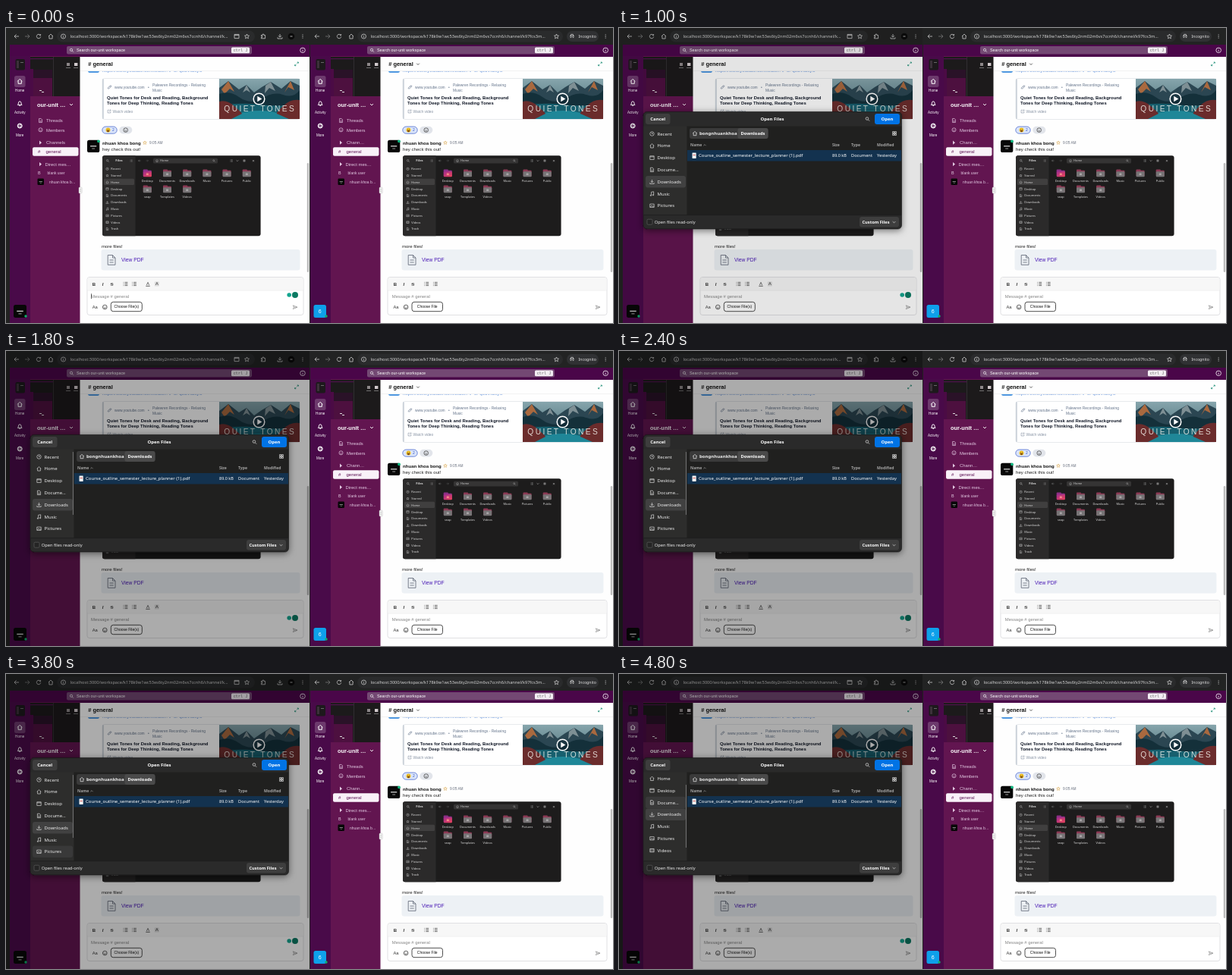
Animation of 800x389 px, one loop 5 s. Source, as an HTML page:

```html
<!DOCTYPE html>
<html lang="en">
<head>
<meta charset="utf-8">
<title>Team chat file upload</title>
<style>
html, body { margin: 0; width: 100%; height: 100%; overflow: hidden; background: #222; }
svg { display: block; width: 100vw; height: 100vh; font-family: "Liberation Sans", Arial, sans-serif; }
.ui { font-family: "Noto Sans", "Open Sans", sans-serif; }
.mono { font-family: "Liberation Mono", monospace; }
</style>
</head>
<body>
<svg id="stage" viewBox="0 0 800 389" preserveAspectRatio="none" xml:space="preserve"></svg>
<script>
const ICONS = {
  home: 'M-3 0L0-3 3 0M-2.1-.9V3H2.1V-.9',
  clock: 'M3 0A3 3 0 1 1-3 0A3 3 0 1 1 3 0M0-1.7V0H1.4',
  info: 'M3 0A3 3 0 1 1-3 0A3 3 0 1 1 3 0M0-.4V1.6M0-1.7V-1.2',
  desk: 'M-3-2.6H3V2.6H-3ZM-3-1.4H3',
  doc: 'M-2.3-3H.8L2.3-1.5V3H-2.3ZM-1 .2H1M-1 1.6H1',
  down: 'M0-3V1M-2-.8L0 1.2 2-.8M-3 1.4V3H3V1.4',
  note: 'M-1 2V-2.4L2.4-3V1.4M-1 2H-2.4V3H-1ZM2.4 1.4H1V2.4H2.4Z',
  pic: 'M-3-2.4H3V2.4H-3ZM-2.4 2L-.6-.2 1 1.2 2 .3 2.8 1.6',
  film: 'M-3-2.4H3V2.4H-3ZM-1.5-2.4V2.4M1.5-2.4V2.4',
  star: 'M0-3L.9-1 3-.8 1.4.6 1.9 2.8 0 1.7-1.9 2.8-1.4.6-3-.8-.9-1Z',
  find: 'M1.4-.6A2 2 0 1 1-2.6-.6A2 2 0 1 1 1.4-.6M.9.9L3 3',
  face: 'M3 0A3 3 0 1 1-3 0A3 3 0 1 1 3 0M-1.5.7Q0 2.4 1.5.7M-1.1-1.1V-.6M1.1-1.1V-.6',
  send: 'M-2.7-2.4L3 0-2.7 2.4-1.6 0ZM-1.6 0H3',
  bell: 'M-2.8 1.6Q-1.8.6-1.8-1Q-1.6-3 0-3Q1.6-3 1.8-1Q1.8.6 2.8 1.6ZM-.7 2.8H.7',
  gear: 'M3 0A3 3 0 1 1-3 0A3 3 0 1 1 3 0M0-3V-1M0 1V3M-3 0H-1M1 0H3M-2-2L-.8-.8M.8.8L2 2M-2 2L-.8.8M.8-.8L2-2',
  back: 'M3 0H-3M-.4-2.6L-3 0-.4 2.6',
  next: 'M-3 0H3M.4-2.6L3 0 .4 2.6',
  reload: 'M2.2-1.6A2.7 2.7 0 1 0 2.7.5M2.6-3V-1.3H.9',
  dots: 'M0-2.6V-1.8M0-.4V.4M0 1.8V2.6',
  chev: 'M-2-1L0 1 2-1',
  list: 'M-1-2.2H3M-1 0H3M-1 2.2H3M-3-2.2H-2.3M-3 0H-2.3M-3 2.2H-2.3',
  link: 'M-.4.4L1.4-1.4M-.8-.8L.8-2.4Q2-3 2.6-2.4 3.2-1.6 2.4-.8L.9.8M.8.8L-.8 2.4Q-2 3-2.6 2.4-3.2 1.6-2.4.8L-.9-.8',
  out: 'M0-2.4H-2.6V2.6H2.4V0M-.4.4L2.7-2.7M.8-2.7H2.7V-.8',
  wide: 'M.6-.6L2.6-2.6M.9-2.6H2.6V-.9M-.6.6L-2.6 2.6M-.9 2.6H-2.6V.9',
  grid: 'M-2.4-2.4H-.4V-.4H-2.4ZM.4-2.4H2.4V-.4H.4ZM-2.4.4H-.4V2.4H-2.4ZM.4.4H2.4V2.4H.4Z',
  puzzle: 'M-2.6-1.5H-.9V-2.8H.9V-1.5H2.6V2.8H-2.6V1.2H-1.2V-.2H-2.6Z',
  spy: 'M-3-.3H3M-1.8-.3L-1.3-2.6H1.3L1.8-.3M-2.4 1.5H-.7M.7 1.5H2.4'
};

const rect = (x, y, w, h, fill, r = 0, more = '') =>
  `<rect x="${x}" y="${y}" width="${w}" height="${h}" rx="${r}" fill="${fill}" ${more}/>`;
const edge = (color, w = .6) => `stroke="${color}" stroke-width="${w}"`;
const dot = (x, y, r, fill, more = '') => `<circle cx="${x}" cy="${y}" r="${r}" fill="${fill}" ${more}/>`;
// y is the optical middle of the line
const text = (x, y, s, size, fill, more = '') =>
  `<text x="${x}" y="${(y + size * .35).toFixed(2)}" font-size="${size}" fill="${fill}" ${more}>${s}</text>`;
const icon = (name, x, y, color, scale = 1, w = .8) =>
  `<path transform="translate(${x} ${y}) scale(${scale})" d="${ICONS[name]}" fill="none" stroke="${color}" stroke-width="${w}"/>`;
const path = (d, fill, more = '') => `<path d="${d}" fill="${fill}" ${more}/>`;
const bold = 'font-weight="700"', mid = 'text-anchor="middle"';

function avatar(x, y, s) {
  return rect(x, y, s, s, '#070707', s * .16) +
    rect(x + s * .25, y + s * .45, s * .5, s * .09, '#bbb') + rect(x + s * .38, y + s * .66, s * .24, s * .07, '#888');
}

function browserBar(right, e) {
  const tail = right ? 'k97fcs3m...' : 'k...', c = '#c9c9c9';
  let s = rect(0, 0, 404, 22, '#222323') + rect(67, 3.5, right ? 271 : 261, 15, '#2a2b2c', 7.5);
  s += icon('back', 14, 11, c) + icon('next', 28, 11, '#777') + icon('reload', 43, 11, c) + icon('home', 59, 11, c) + icon('info', 75.5, 11, c);
  s += text(84.5, 11, `localhost:3000/workspace/k178k9w1wc53es6ty2nm02m6vs7ccnh6/channel/${tail}`, 5.62, '#d4d4d4', 'class="ui"');
  s += icon('dots', 391 + e * .8, 11, c, 1, 1.2);
  if (right) return s + icon('star', 329.5, 11, c) + rect(343, 4, 42, 14, '#303133', 7) + icon('spy', 350, 11, '#ddd') +
    text(358.5, 11, 'Incognito', 5.2, '#e2e2e2', 'class="ui"');
  return s + icon('desk', 304, 11, c) + icon('star', 317.5, 11, c) + icon('puzzle', 339, 11, c) +
    icon('down', 361, 11, c) + dot(376, 11, 4.3, '#0b0b0b') + rect(374.5, 10.5, 3, 1, '#aaa');
}

function toolbar(e) {
  return rect(5, 22, 400, 16, '#4a0649') + rect(80, 24, 244 + e * .75, 10.6, '#734873', 2) +
    icon('find', 86.5, 29.3, '#fff', .8) + text(93, 29.4, 'Search our-unit workspace', 5.4, '#fff') +
    rect(297 + e, 25.5, 24, 7.8, '#f3edf3', 1.5) + text(309 + e, 29.4, 'ctrl J', 5.2, '#666', `class="mono" ${mid}`) +
    icon('info', 391 + e * .8, 29.3, '#fff', 1.1, .7);
}

function rail(right) {
  let s = rect(5, 37, 27, 352, '#490a49');
  s += rect(12.5, 41, 12.5, 14.5, '#1d191c', 2) + rect(14, 43, 3, 10, '#3c303a') + rect(19, 45, 4, 1, '#666');
  s += rect(11, 63, 14.5, 15, '#6d3a6d', 2.5) + icon('home', 18.2, 70.3, '#fff', 1, 1);
  s += icon('bell', 18.2, 99.8, '#fff', 1, 1) + icon('gear', 18.2, 129, '#fff', 1, 1);
  [['Home', 82.5], ['Activity', 111.8], ['More', 141]].forEach(([n, y]) => s += text(18.2, y, n, 4.6, '#fff', mid));
  s += right
    ? rect(9.5, 365, 16.5, 17, '#0ea0ea', 2.5) + text(17.8, 373.5, '6', 7, '#fff', mid)
    : avatar(10, 365, 17);
  return s + dot(26, 380, 1.7, '#0fae6d');
}

function sidebar(right) {
  const soft = '#e3cbe3';
  let s = rect(32, 37, 66, 352, '#621550');
  s += rect(32, 38, 66, 52, '#1c1a1b') + rect(32, 40, 30, 1.2, '#4e134b') + rect(32, 54, 4, 36, '#4b0b45') +
    rect(36, 66, 25, 24, '#4d103f') + rect(36, 55, 25, 11, '#2a1228') + rect(44, 82, 3, 1, '#ddd') + rect(47, 84, 3, 1, '#ddd') +
    rect(62, 38, .8, 52, '#383438') + rect(80, 46, 4, 4, '#8d8789') + rect(90, 46, 4.4, 4, '#d0c8cb') + rect(79, 52, 6, .8, '#888') + rect(89, 52, 6, .8, '#888');
  s += text(41, 101, 'our-unit …', 7.4, '#fff', bold) + icon('chev', 86, 101, '#fff', 1, .9);
  s += icon('doc', 45.5, 122, soft, .85) + text(53, 122, 'Threads', 5.9, soft);
  s += icon('face', 45.5, 134.3, soft, .85) + text(53, 134.5, 'Members', 5.9, soft);
  s += path('M44 148.6L47 151.2 44 153.8Z', soft) + text(53, 151.3, right ? 'Chann…' : 'Channels', 5.9, soft);
  s += rect(35, 157.2, 60.5, 11.5, '#f9f1f8', 2) + text(42, 163, '#', 6, '#5b1152') + text(52.5, 163, 'general', 6, '#5b1152');
  s += path('M44 177L47 179.6 44 182.2Z', soft) + text(51.5, 179.6, 'Direct mes…', 5.9, soft);
  s += text(42, 191, 'B', 5.4, soft) + text(54.5, 191, 'blank user', 5, soft);
  return s + avatar(41.5, 198.5, 8.5) + text(57, 203, 'nhuan khoa b…', 4.9, soft);
}

function thumb(e) {
  const x = 281 + e;
  let s = rect(x, 67, 106, 53, 'url(#sky)');
  const hill = (d, f) => path(d, f, `transform="translate(${x} 67)"`);
  s += hill('M0 12L12 3 26 14 36 8 46 18 56 11 68 4 82 13 94 3 106 9V40H0Z', '#2b4652');
  s += hill('M12 3L20 17 14 13 7 20 3 14ZM94 3L99 15 91 11 86 18Z', '#a9693f');
  s += hill('M36 8L41 18 36 15 31 18ZM68 4L74 16 66 12 60 19 61 9Z', '#7e8f94');
  s += hill('M0 20Q14 15 26 24T54 28Q70 16 84 21T106 15V42H0Z', '#14303a');
  s += hill('M0 35Q26 31 53 34T106 34V53H0Z', '#175f6e');
  s += hill('M20 47Q54 37 84 47L92 53H14Z', '#1f8798');
  s += hill('M0 30Q10 27 20 36T30 46L16 53H0ZM106 28Q94 26 84 36T76 46L92 53H106Z', '#6b2c2c');
  s += dot(x + 52.5, 93.5, 7.3, '#102a35', `fill-opacity=".55" ${edge('#fff', 1.5)}`) + path(`M${x + 50.3} 89.8L${x + 56.4} 93.5 ${x + 50.3} 97.2Z`, '#fff');
  return s + text(x + 53.8, 106, 'QUIET TONES', 10.2, '#f4f4ef', `${mid} letter-spacing="2.4" fill-opacity=".85"`);
}

function linkCard(e) {
  const grey = '#64748b';
  return `<g clip-path="url(#cut)">${rect(108, 48, 15, 10.8, '#1677d8', 2)}${text(127, 55.8, 'https://www.youtube.com/watch?v=oPq8dVk2xyU', 6, '#2a6cd0')}</g>` +
    rect(127, 66.5, 260 + e, 54, '#fff', 3, edge('#d9dde3')) + rect(127, 67, 1.8, 53, '#cbd2da', .9) +
    icon('link', 136.5, 78, grey, .8) + text(143, 78, 'www.youtube.com', 4.9, grey) + text(187, 78, '•', 4.9, grey) +
    text(193, 75, 'Palewren Recordings - Relaxing', 4.9, grey) + text(193, 82, 'Music', 4.9, grey) +
    text(133, 92, 'Quiet Tones for Desk and Reading, Background', 5.9, '#111827', bold) +
    text(133, 99.4, 'Tones for Deep Thinking, Reading Tones', 5.9, '#111827', bold) +
    icon('out', 136, 110, '#8793a3', .75) + text(140.5, 110, 'Watch video', 4.9, '#8793a3') + thumb(e);
}

function folder(x, y, name, vivid) {
  return rect(x - 5.5, y - 5, 6, 4, vivid ? '#8d2f86' : '#8c3a55', .8) + rect(x - 5.5, y - 3.8, 11, 8, vivid ? '#8d2f86' : '#8c3a55', 1) +
    rect(x - 5.5, y - 2.2, 11, 7, vivid ? 'url(#pink)' : '#777476', 1) + rect(x - 1.5, y, 3, 2.6, vivid ? '#f48a8a' : '#a9a6a8', .4) +
    text(x, y + 10, name, 3.9, '#ddd', `class="ui" ${mid}`);
}

function fileShot() {
  let s = rect(127, 168.2, 208.6, 106, '#1d1c1c', 3) + path('M130 168.2H170.5V274.2H130Q127 274.2 127 271.2V171.2Q127 168.2 130 168.2Z', '#2b2a2a');
  s += icon('find', 134, 175, '#bbb', .6) + text(149, 175, 'Files', 4.2, '#ddd', `class="ui" ${mid} ${bold}`) + icon('list', 165, 175, '#aaa', .5);
  s += icon('back', 176, 175, '#999', .5) + icon('next', 186, 175, '#666', .5) + rect(194, 171.7, 85, 6.8, '#353434', 1.5) +
    icon('home', 199, 175, '#ccc', .5) + text(203, 175, 'Home', 4, '#ccc', 'class="ui"') + icon('find', 274, 175, '#bbb', .5);
  s += icon('list', 297, 175, '#bbb', .55) + icon('chev', 305, 175, '#bbb', .7) + icon('grid', 314, 175, '#bbb', .5) + text(326, 174.8, '×', 6, '#bbb', mid);
  s += rect(129, 198.8, 40, 8.2, '#403f3f', 1.5);
  const kinds = ['clock', 'star', 'home', 'desk', 'doc', 'down', 'note', 'pic', 'film', 'doc'];
  ['Recent', 'Starred', 'Home', 'Desktop', 'Documents', 'Downloads', 'Music', 'Pictures', 'Videos', 'Trash'].forEach((n, i) => {
    const y = 185.8 + i * 8.8;
    s += icon(kinds[i], 133.5, y, '#ccc', .55) + text(138.3, y, n, 3.9, '#ddd', 'class="ui"');
  });
  ['Desktop', 'Documents', 'Downloads', 'Music', 'Pictures', 'Public', 'snap', 'Templates', 'Videos'].forEach((n, i) =>
    s += folder(186.3 + i % 6 * 26.2, i < 6 ? 191.5 : 212.5, n, !i));
  return s;
}

function messages(e) {
  let s = linkCard(e);
  s += rect(126.8, 130, 19.4, 9.2, '#dbe5fa', 4.6, edge('#3558c8', .7)) + dot(134.5, 134.6, 3, '#f5c628') +
    path('M132.5 135H136.5Q136 137 134.5 137T132.5 135Z', '#6b3a16') + dot(133.4, 133.7, .5, '#4a3010') + dot(135.6, 133.7, .5, '#4a3010') +
    text(141.3, 134.7, '2', 5, '#3558c8', mid);
  s += rect(149.3, 129.8, 17, 9.6, '#e2e5eb', 4.8) + icon('face', 157.7, 134.6, '#444', .95, .8);
  s += avatar(107, 147.7, 16.3) + dot(122, 149.3, 1.9, '#10b981');
  s += text(127, 151.4, 'nhuan khoa bong', 6.1, '#151515', bold) + icon('star', 183, 151.2, '#d9a548', .75) +
    text(189, 151.4, '9:05 AM', 4.8, '#6b7280') + text(127, 160, 'hey check this out!', 6.1, '#222');
  s += fileShot() + text(126, 287.6, 'more files!', 6, '#222');
  s += rect(125.5, 292, 262 + e, 27.5, '#edf1f5', 3) +
    path('M134.2 299.5H140.5L144 303V312.3H134.2ZM140.5 299.5V303H144M136.5 306H141.7M136.5 309H141.7', 'none', edge('#6b7280', .9));
  return s + text(152, 305.6, 'View PDF', 6.7, '#4a1bb5');
}

function composer(right, e) {
  const ink = '#333', o = right ? .8 : 0;
  let s = rect(107, 328.5, 285 + e, 50, '#fff', 3, edge('#d4d4d8', .7)) + rect(107.5, 329, 284 + e, 17, '#f7f7f7', 2.5) + rect(107, 345.8, 285 + e, .5, '#e3e3e3');
  s += text(116 + o, 337.5, 'B', 6, ink, `${mid} ${bold}`) + text(127.5 + o, 337.5, 'I', 6, ink, `${mid} font-style="italic" ${bold}`) +
    text(139.5 + o, 337.5, 'S', 6, ink, `${mid} text-decoration="line-through"`) + icon('list', 157.5 + o, 337.5, ink, .95) + icon('list', 169 + o, 337.5, ink, .95);
  if (!right) s += text(187, 336.8, 'A', 6, ink, mid) + rect(184.3, 339.8, 5.4, .8, ink) +
    rect(195.8, 334.4, 6, 6.2, '#ddd', .5) + text(198.8, 337.5, 'A', 5.6, ink, mid);
  s += text(112 + o, 353.6, 'Message # general', 5.9, '#858585') + text(113.7 + o, 368.2, 'Aa', 5.8, ink) + icon('face', 130.3 + o, 368, ink, .95);
  s += right
    ? rect(139, 361.3, 40.5, 12.4, '#fff', 3, edge('#222', .8)) + text(159.2, 367.3, 'Choose File', 5, '#111', mid)
    : rect(138.3, 361.3, 41, 12.4, '#fff', 3, `id="pick" ${edge('#222', .8)}`) +
      rect(137.7, 360.5, 42.2, 13.8, '#efeff2', 4, `id="ring" ${edge('#3a18b4', 1.2)}`) + text(158.8, 367.3, 'Choose File(s)', 5, '#111', mid) +
      rect(112, 350.3, .7, 6.8, '#222', 0, 'id="caret"') + dot(373.2, 352, 2.8, '#13a58f') + dot(381, 352, 4, '#0b7a63');
  return s + icon('send', 381 + e * .75, 368.2, '#9a9a9a');
}

function browser(right) {
  const e = right ? 4 : 0;
  let s = rect(0, 0, 404, 389, '#222') + browserBar(right, e) + toolbar(e) + rail(right) + sidebar(right) + rect(97.5, 38, 306.5, 351, '#fefefe');
  s += text(108.3, 47.3, '# general', 7.4, '#111', bold) + icon('wide', 383 + e, 47.4, '#128a70', .9, .9) + rect(98, 56, 306, .5, '#e4e4e4');
  if (right) s += icon('chev', 147, 47.6, '#222', .9);
  s += messages(e) + composer(right, e) + rect(396.8 + e, 178, 2.4, 144, '#bcbcbc', 1.2);
  s += rect(96, 210, 4.2, 8, '#f1f1f1', 1, edge('#bbb', .4)) + icon('dots', 98.1, 214, '#555', .7);
  return `<g transform="translate(${right ? 396 : 0})" clip-path="url(#${right ? 'winR' : 'winL'})">${s}</g>`;
}

function places() {
  const kinds = ['clock', 'home', 'desk', 'doc', 'down', 'note', 'pic', 'film'];
  return ['Recent', 'Home', 'Desktop', 'Docume…', 'Downloads', 'Music', 'Pictures', 'Videos'].map((n, i) => {
    const y = 139.5 + i * 15.8;
    return icon(kinds[i], 43.5, y, '#ddd', .9, .75) + text(50.5, y, n, 6, '#eee', 'class="ui"');
  }).join('');
}

function dialog() {
  const ui = 'class="ui"', head = `${ui} ${bold}`, dim = '#a5a5a5';
  let s = rect(32, 110.5, 340.5, 154.5, '#292929', 5, `${edge('#151515')} filter="url(#shadow)"`) +
    rect(32.5, 129.5, 57, 117, '#2d2d2c') + rect(89.5, 129.5, 282.7, 117, '#20201f');
  s += rect(35, 113, 32.5, 14, '#3d3d3d', 3) + text(51.2, 120, 'Cancel', 6, '#fff', `${head} ${mid}`) +
    text(202, 120, 'Open Files', 6, '#fff', `${head} ${mid}`) + icon('find', 327.5, 120, '#ddd', .9) +
    rect(337, 113, 33, 14, '#0073e5', 3) + text(353.5, 120, 'Open', 6, '#fff', `${head} ${mid}`);
  s += `<g clip-path="url(#side)"><g id="places">${rect(35, 195, 53, 15.5, '#414141', 3)}` +
    rect(35, 0, 53, 15.5, '#393939', 3, 'id="hover"') + `${places()}</g>` + rect(87.9, 133, 1, 83, '#777', .5, 'id="thumb"') + '</g>';
  s += rect(93, 132, 103.5, 14, '#3a3a3a', 3) + rect(156.5, 132, 40, 14, '#4a4a4a', 3) + icon('home', 100, 139, '#eee', .9) +
    text(106, 139, 'bongnhuankhoa', 6, '#eee', head) + text(176.5, 139, 'Downloads', 5.8, '#fff', `${head} ${mid}`) + icon('grid', 363, 139, '#ddd');
  s += text(94, 154.4, 'Name', 5.1, dim, head) + icon('chev', 113, 154.4, dim, -.8) + text(281, 154.4, 'Size', 5.1, dim, head) +
    text(306, 154.4, 'Type', 5.1, dim, head) + text(340, 154.4, 'Modified', 5.1, dim, head);
  s += rect(90, 161, 282, 14.5, '#13324f') + rect(96.5, 164.5, 5.2, 7.4, '#f0f0f0', .6) + rect(97.5, 167, 3.2, .8, '#c33');
  [[105, 'Course_outline_semester_lecture_planner (1).pdf', 6], [281, '89.0 kB', 5.5], [306, 'Document', 5.7], [340, 'Yesterday', 5.7]]
    .forEach(([x, n, size]) => s += text(x, 168.3, n, size, '#fff', ui));
  s += rect(32.5, 246.5, 339.5, .6, '#191919') + rect(37, 252.2, 7, 7, '#242424', 1.4, edge('#666')) + text(46.8, 256, 'Open files read-only', 5.7, '#eee', ui) +
    rect(317, 249, 52, 13.5, '#3e3e3e', 3) + text(320.5, 256, 'Custom Files', 5.7, '#fff', head) + icon('chev', 362.5, 256, '#ddd', .9);
  return `<g id="dialog">${s}</g>`;
}

const clip = (id, x, y, w, h) => `<clipPath id="${id}">${rect(x, y, w, h, '#000')}</clipPath>`;
const fade = (id, top, bottom, vec = 'x2="0" y2="1"') =>
  `<linearGradient id="${id}" ${vec}><stop stop-color="${top}"/><stop offset="1" stop-color="${bottom}"/></linearGradient>`;

const stage = document.getElementById('stage');
stage.innerHTML = `<defs>${clip('winL', 0, 0, 400, 389)}${clip('winR', 4, 0, 400, 389)}${clip('cut', 100, 57.3, 300, 3)}${clip('side', 32, 129.5, 58, 117)}` +
  fade('sky', '#86a5ac', '#41656f') + fade('pink', '#a12d8f', '#ee4558', 'x2="1" y2="1"') +
  '<filter id="shadow"><feDropShadow dx="0" dy="2" stdDeviation="5" flood-opacity=".5"/></filter></defs>' +
  browser(false) + browser(true) + rect(0, 0, 400, 389, '#000', 0, 'id="shade"') + dialog();

const $ = id => document.getElementById(id);
const set = (id, attrs) => Object.entries(attrs).forEach(([k, v]) => $(id).setAttribute(k, v));
const show = (id, on) => set(id, { visibility: on ? 'visible' : 'hidden' });

function draw(ms) {
  const t = Math.floor(ms % 5000 / 200) * 200;
  const scrolled = t >= 4200;
  show('caret', t < 200);
  show('ring', t >= 600 && t < 1000);
  set('shade', { 'fill-opacity': t < 1000 ? 0 : Math.min(.33, .1 + (t - 1000) / 1600) });
  show('dialog', t >= 1000);
  show('thumb', t >= 1200);
  set('places', { transform: `translate(0 ${scrolled ? -17.5 : 0})` });
  set('thumb', { y: scrolled ? 146 : 133 });
  set('hover', { y: scrolled ? 179.2 : 226.5, 'fill-opacity': t >= 3800 ? 1 : 0 });
}

function tick() {
  draw(performance.now());
  requestAnimationFrame(tick);
}
tick();
</script>
</body>
</html>
```
